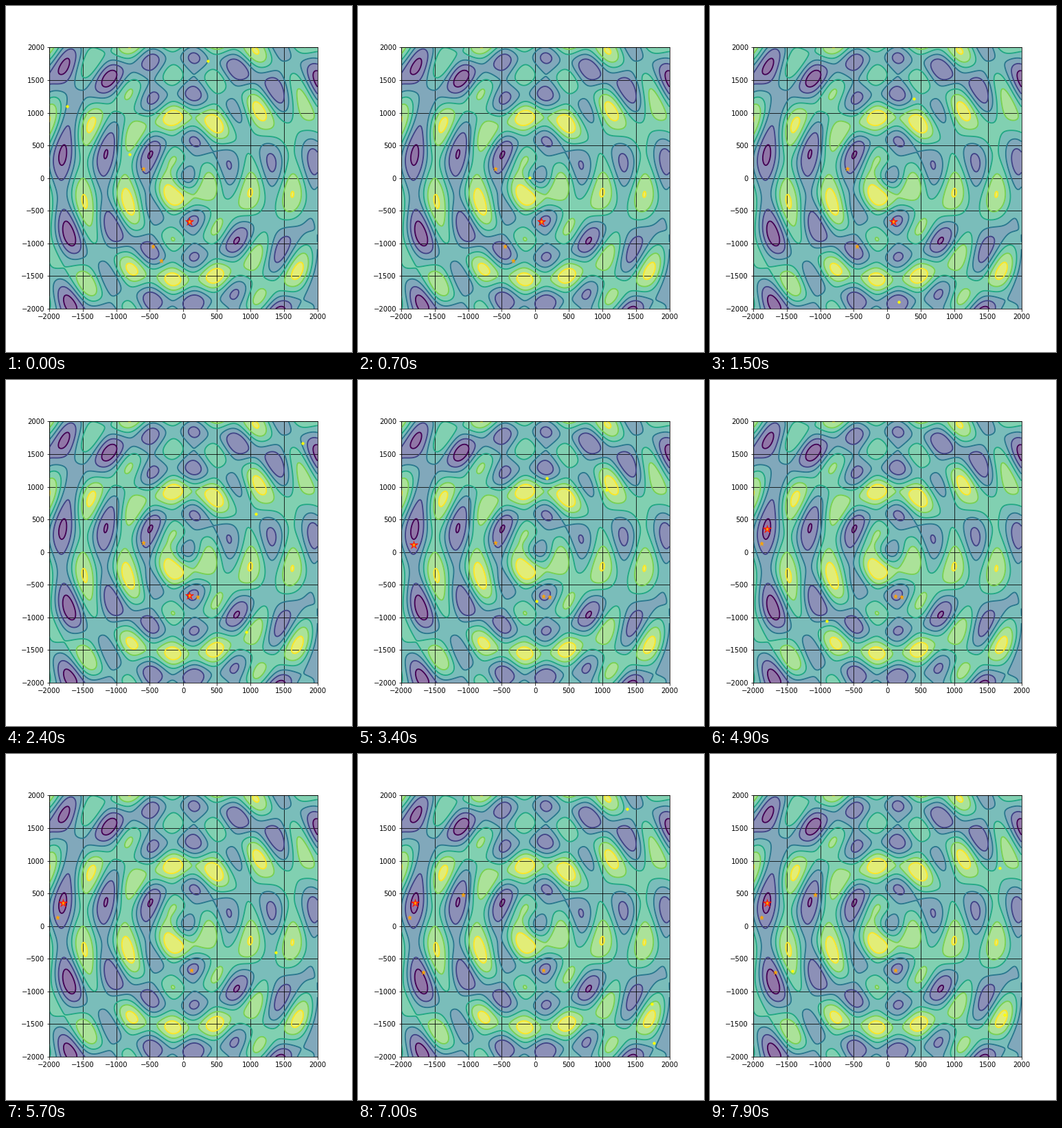
A matplotlib script that plays this animation: 504x504 px, repeating every 8 s.

```python
import numpy as np
import matplotlib.pyplot as plt
from matplotlib.animation import FuncAnimation

plt.rcParams["font.family"] = "DejaVu Sans"
plt.rcParams["font.size"] = 10

FRAMES, STEP = 80, 100
LIM = 2000

# food sources: first step, last step, x, y
FOOD = [(0, 39, -597, 144), (0, 21, -454, -1042), (0, 7, -331, -1263),
        (24, 51, 212, -685), (30, 79, 115, -675), (40, 79, -1877, 134),
        (60, 79, -1078, 480), (64, 79, -1672, -706)]
# best source: first step, x, y
BEST = [(0, 94, -670), (30, -1816, 113), (40, -1795, 354)]


def height(x, y):
    """Two plane waves and a ring wave on a tilted dome."""
    r = np.hypot(x, y)
    waves = (0.95 * np.sin(x / 100) + 0.9 * np.sin(y / 192)
             + 1.15 * np.cos(r / 100))
    return 0.12 * x / 1000 - 0.12 * (r / 1000) ** 2 - waves - 0.05


def scouts(i):
    rng = np.random.default_rng(100 + i)
    return rng.uniform(-0.95 * LIM, 0.95 * LIM, (2, rng.integers(1, 4)))


fig, ax = plt.subplots(figsize=(7, 7), dpi=72, facecolor="white")
fig.subplots_adjust(left=0.125, right=0.9, bottom=0.125, top=0.88)

axis = np.linspace(-LIM, LIM, 281)
X, Y = np.meshgrid(axis, axis)
Z = height(X, Y)
ax.contourf(X, Y, Z, levels=np.arange(-4, 4), cmap="viridis", alpha=0.6)
ax.contour(X, Y, Z, levels=np.arange(-3, 3), cmap="viridis",
           linewidths=1.8, linestyles="solid")

ticks = range(-LIM, LIM + 1, 500)
ax.set(xlim=(-LIM, LIM), ylim=(-LIM, LIM), xticks=ticks, yticks=ticks)
ax.grid(color="black", linewidth=0.8)


def markers(shape, size, color, z):
    return ax.plot([], [], shape, ms=size, color=color,
                   markeredgewidth=0.6, zorder=z)[0]


dots = markers("o", 3.6, "yellow", 4)
food = markers("*", 6.5, "orange", 5)
best = markers("*", 13, "#ff1400", 6)
core = markers("*", 5, "orange", 7)


def update(i):
    dots.set_data(*scouts(i))
    food.set_data(*zip(*[(x, y) for a, b, x, y in FOOD if a <= i <= b]))
    _, x, y = [p for p in BEST if p[0] <= i][-1]
    for star in (best, core):
        star.set_data([x], [y])
    return dots, food, best, core


anim = FuncAnimation(fig, update, frames=FRAMES, interval=STEP,
                     repeat=True, repeat_delay=0, blit=False)
plt.show()
```
